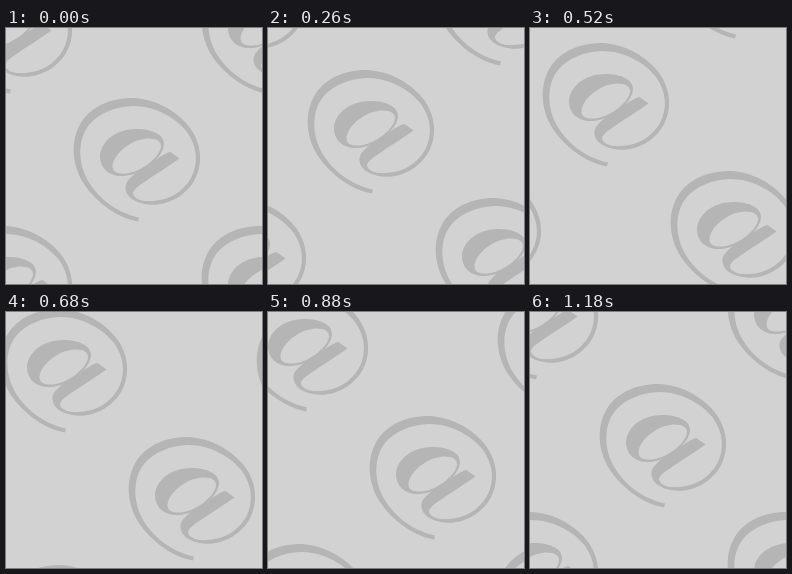
Write an HTML page that moves like this. It is 256 by 256 pixels and loops after 1200 ms.

```html
<!DOCTYPE html>
<html lang="en">
<head>
<meta charset="utf-8">
<title>Drifting at signs</title>
<style>
  html, body { margin: 0; width: 100%; height: 100%; overflow: hidden; background: #d2d2d2; }
  svg { display: block; width: 100vw; height: 100vh; }
</style>
</head>
<body>
<svg viewBox="0 0 256 256">
  <defs>
    <g id="at" fill="#b5b5b5">
      <!-- ring running into the stem of the letter -->
      <path d="M133 189.5 L132 193.5 C110 189.5 87 172 75.5 152 C65 132 65 110 76 93
        C88 76 108 70 127 70 C150 71 172 83.5 184.5 100.5 C196 117 197 137 188.5 152
        C180 168 160 178.5 143 176.5 C128 175 118.5 168 119.5 158 C120.5 152 127 147.5 132 143
        L151 131 C157 127 161 124.5 164.5 124 L173.5 130.5 C163 138 150 146 140 153
        C129 160 124 164.5 129 169 C133 173 140 173.5 147 173 C163 172 177 164 185 150
        C193 135 191 118 181 104 C169 89 149 78 127 78 C110 78.5 93 85 83 97
        C72 111 72 132 80 149 C90 169 110 184.5 133 189.5Z"/>
      <!-- bowl with its counter -->
      <path fill-rule="evenodd" d="M94 128 C95 112 112 101 130 101 C147 101 158 107 158 116
        C158 129 136 147.5 117 148 C103 148.5 94 140 94 128Z
        M107 141 C104 132 117 117 133 112 C145 108.5 155 111 155 118
        C155 128 136 144 120 145.5 C113 146 108 144.5 107 141Z"/>
    </g>
  </defs>
  <g id="sheet"></g>
</svg>
<script>
  const LOOP = 1200, STEP = 20, SHIFT = 128;
  const sheet = document.getElementById('sheet');

  // Checkerboard lattice, large enough to cover the stage during one shift
  for (let row = -1; row <= 2; row++) {
    for (let col = -1; col <= 2; col++) {
      if ((row + col) % 2) continue;
      const use = document.createElementNS('http://www.w3.org/2000/svg', 'use');
      use.setAttribute('href', '#at');
      use.setAttribute('x', col * SHIFT);
      use.setAttribute('y', row * SHIFT);
      sheet.append(use);
    }
  }

  const start = performance.now();

  function draw(now) {
    const time = Math.max(0, now - start) % LOOP;
    const tick = Math.floor(time / STEP) * STEP;
    const d = -Math.round(SHIFT * tick / LOOP);
    sheet.setAttribute('transform', `translate(${d} ${d})`);
    requestAnimationFrame(draw);
  }
  draw(start);
</script>
</body>
</html>
```
